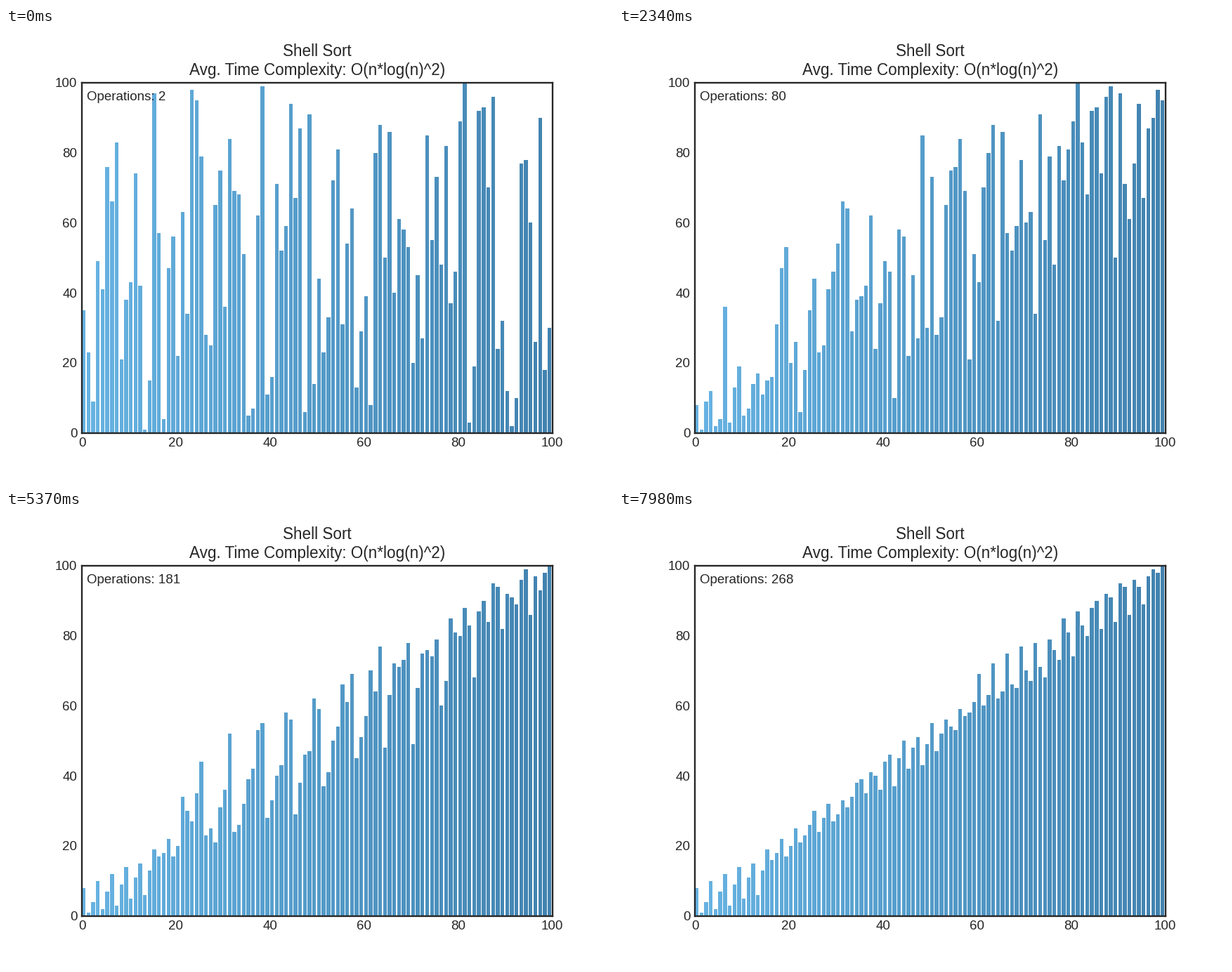
Write a matplotlib script that moves like this. It is 864 by 648 pixels and loops after 8 s.

```python
import numpy as np
import matplotlib.pyplot as plt
from matplotlib.animation import FuncAnimation
from matplotlib.colors import LinearSegmentedColormap

LOOP_MS = 8000
FRAMES = 267
FIRST_OP = 2
INK = "0.15"

START = [
    35, 23, 9, 49, 41, 76, 66, 83, 21, 38, 43, 74, 42, 1, 15, 97, 57, 4, 47, 56,
    22, 63, 34, 98, 95, 79, 28, 25, 65, 75, 36, 84, 69, 68, 51, 5, 7, 62, 99, 11,
    16, 71, 52, 59, 94, 67, 87, 6, 91, 14, 44, 17, 33, 72, 81, 31, 54, 64, 13, 29,
    39, 8, 80, 88, 50, 86, 40, 61, 58, 53, 20, 45, 27, 85, 55, 73, 48, 82, 37, 46,
    89, 100, 3, 19, 92, 93, 70, 96, 24, 32, 12, 2, 10, 77, 78, 60, 26, 90, 18, 30,
]


def shell_sort(values):
    """Yield a snapshot after every single shift."""
    a = list(values)
    gap = len(a) // 2
    while gap > 0:
        for i in range(gap, len(a)):
            held, j = a[i], i
            while j >= gap and a[j - gap] > held:
                a[j] = a[j - gap]
                j -= gap
                yield a.copy()
            a[j] = held
        gap //= 2


plt.rcParams.update({
    "font.family": "Liberation Sans",
    "font.size": 10,
    "text.color": INK,
    "axes.edgecolor": INK,
    "axes.linewidth": 1.25,
    "axes.titlesize": 12,
    "xtick.color": INK,
    "ytick.color": INK,
    "xtick.major.size": 0,
    "ytick.major.size": 0,
})

steps = list(shell_sort(START))[:FRAMES]
n = len(START)
blues = LinearSegmentedColormap.from_list("blues", ["#67b3e2", "#4283b0"])

fig, ax = plt.subplots(figsize=(6.4, 4.8), dpi=135)
ax.set_title("Shell Sort\nAvg. Time Complexity: O(n*log(n)^2)")
ax.set_xlim(0, n)
ax.set_ylim(0, 100)
bars = ax.bar(range(n), steps[0], align="edge", color=blues(np.linspace(0, 1, n)))
label = ax.text(0.01, 0.95, "", transform=ax.transAxes)


def update(frame):
    for bar, height in zip(bars, steps[frame]):
        bar.set_height(height)
    label.set_text(f"Operations: {FIRST_OP + frame}")
    return [*bars, label]


anim = FuncAnimation(fig, update, frames=FRAMES, interval=LOOP_MS / FRAMES,
                     repeat=True, repeat_delay=0)
plt.show()
```
